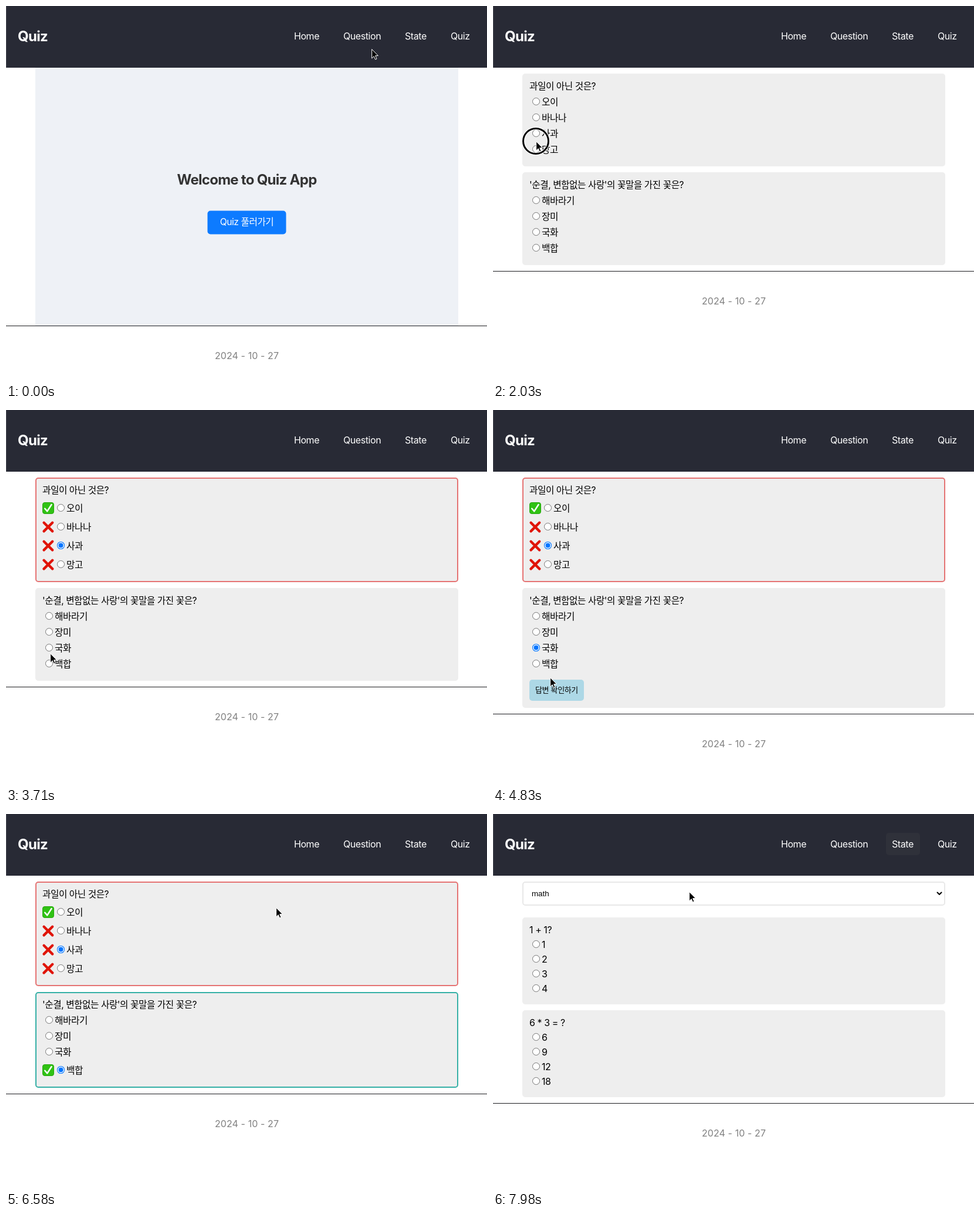
An HTML page for the animation above (8 s loop, 820 by 640 pixels).

```html
<!DOCTYPE html>
<html lang="ko">
<head>
<meta charset="utf-8">
<title>Quiz</title>
<style>
html, body { margin: 0; width: 100%; height: 100%; overflow: hidden; background: #fff; }
svg { display: block; width: 820px; height: 640px; }
text {
  font: 16px Inter, "Noto Sans CJK KR", "Noto Sans CJK", sans-serif;
  font-optical-sizing: none;
  letter-spacing: -.027em;
  white-space: pre;
}
.ko { font-size: 15.7px; letter-spacing: -.03em; }
.bold { font-size: 24px; font-weight: 700; letter-spacing: -.03em; }
.small { font-size: 13px; }
.date { letter-spacing: .1px; }
.select { font: 13.33px "Liberation Sans", Arial, sans-serif; letter-spacing: 0; }
.mid { text-anchor: middle; }
</style>
</head>
<body>
<svg id="stage" viewBox="0 0 820 640" xmlns="http://www.w3.org/2000/svg"></svg>
<script>
const stage = document.getElementById('stage');
const LOOP = 8000, STEP = 70;

const FRUIT = { q: '과일이 아닌 것은?', opts: ['오이', '바나나', '사과', '망고'], right: 0 };
const FLOWER = {
  q: "'순결, 변함없는 사랑'의 꽃말을 가진 꽃은?",
  opts: ['해바라기', '장미', '국화', '백합'], right: 3
};
const SUM = { q: '1 + 1?', opts: ['1', '2', '3', '4'], latin: true };
const PRODUCT = { q: '6 * 3 = ?', opts: ['6', '9', '12', '18'], latin: true };

// Pointer moves: start, end, then where to
const HOME = [623, 73];
const MOVES = [
  [210, 280, 625, 65], [560, 840, 628, 44], [1190, 1960, 73, 230],
  [2310, 2590, 93, 276], [2940, 3710, 75, 414], [4130, 4830, 97, 455],
  [5110, 5250, 70, 441], [5600, 5740, 93, 446], [5740, 5950, 98, 470],
  [6230, 6580, 460, 159], [6580, 6860, 697, 55], [7770, 7980, 334, 132]
];

// Press and release times
const CLICKS = {
  question: [420, 490], fruit: [2030, 2100], checkFruit: [2660, 2800],
  flower: [3920, 4060], flowerAgain: [5460, 5600], checkFlower: [6090, 6300],
  state: [7210, 7280]
};
const QUESTION_PAGE = 980, STATE_PAGE = 7490;

const clicked = (t, name) => t >= CLICKS[name][1];
const ease = u => u * u * (3 - 2 * u);

const rect = (x, y, w, h, fill, more = '') =>
  `<rect x="${x}" y="${y}" width="${w}" height="${h}" fill="${fill}" ${more}/>`;
const text = (x, y, s, cls = '', fill = '#000') =>
  `<text x="${x}" y="${y}" class="${cls}" fill="${fill}">${s}</text>`;
const line = (d, color, width) =>
  `<path d="${d}" fill="none" stroke="${color}" stroke-width="${width}" stroke-linecap="round" stroke-linejoin="round"/>`;
const circle = (x, y, r, fill, stroke = 'none', width = 0) =>
  `<circle cx="${x}" cy="${y}" r="${r}" fill="${fill}" stroke="${stroke}" stroke-width="${width}"/>`;

function pointerAt(t) {
  let [x, y] = HOME;
  for (const [from, to, nx, ny] of MOVES) {
    if (t <= from) break;
    const u = ease(Math.min(1, (t - from) / (to - from)));
    x += (nx - x) * u;
    y += (ny - y) * u;
  }
  return [x, y];
}

function over(t, x, y, w, h) {
  const [px, py] = pointerAt(t);
  return px >= x && px <= x + w && py >= y && py <= y + h;
}

// A hot area whose highlight fades over four steps
let hand = false;
function hotspot(t, fill, ...box) {
  hand = hand || over(t, ...box);
  let glow = 0;
  for (let k = 0; k < 4; k++) glow += over(t - k * STEP, ...box) / 4;
  return rect(...box, fill, `rx="5" opacity="${glow}"`);
}

function header(t) {
  const link = (label, x, w) =>
    hotspot(t, '#444548', x, 32, w, 38) + text(x + 10, 57, label, '', '#fff');
  return rect(0, 0, 820, 105, '#282a35') + rect(0, 0, 1, 105, '#4b4d56') +
    text(20, 60, 'Quiz', 'bold', '#fff') +
    link('Home', 481, 64) + link('Question', 565, 85) +
    link('State', 670, 58) + link('Quiz', 748, 53);
}

const footer = y => rect(0, y, 820, 1, '#1c1c20') +
  text(410.5, y + 57, '2024 - 10 - 27', 'date mid', '#808080');

const radio = (x, y, on) => on
  ? circle(x, y, 6, '#fff', '#0075ff', 1.1) + circle(x, y, 4, '#0075ff')
  : circle(x, y, 6, '#fff', '#767676', 1);

const mark = (y, ok) => ok
  ? rect(62.5, y - 9.5, 19, 19, '#30c214', 'rx="3.5" stroke="#28a810"') +
    line(`M66.3 ${y + .8}L70.3 ${y + 5.4} 77.6 ${y - 6}`, '#fff', 2.5)
  : line(`M64.6 ${y - 7.2}l14.6 14.6m0 -14.6l-14.6 14.6`, '#e01408', 4.4);

// Draws one question card and returns its bottom edge
function card(t, y, item, picked = -1, done = false) {
  const { q, opts, right, latin } = item;
  const cls = latin ? '' : 'ko';
  const wrong = done && picked !== right;
  let rowY = y + (latin ? 33 : 34);
  let body = text(62, y + 27, q, cls);
  opts.forEach((label, i) => {
    const marked = done && (wrong || i === right);
    const h = latin ? 25 : marked ? 32 : 27;
    const cy = rowY + (marked ? 17.5 : h / 2);
    const x = marked ? 93.5 : 73.5;
    if (marked) body += mark(cy + .5, i === right);
    body += radio(x, cy, i === picked) + text(x + 9.5, cy + 6.5, label, cls);
    rowY += h;
  });
  let bottom = rowY + (latin ? 15 : 16);
  if (picked >= 0 && !done) {
    const top = rowY + 14;
    body += rect(62, top, 93, 36, '#add8e6', 'rx="5"') +
      hotspot(t, '#33bbff', 62, top, 93, 36) +
      text(108.5, top + 22, '답변 확인하기', 'small mid');
    bottom = top + 48;
  }
  const box = done
    ? rect(51, y + 1, 719, bottom - y - 2, '#eee', `rx="4" stroke="${wrong ? '#e57373' : '#36b0a6'}" stroke-width="2"`)
    : rect(50, y, 721, bottom - y, '#eee', 'rx="5"');
  return { svg: box + body, bottom };
}

function cards(t, y, first, second) {
  const a = card(t, y, ...first), b = card(t, a.bottom + 10, ...second);
  return a.svg + b.svg + footer(b.bottom + 10);
}

function page(t) {
  if (t < QUESTION_PAGE) {
    return rect(50, 105, 721, 439, '#eef1f6') +
      text(410.5, 304, 'Welcome to Quiz App', 'bold mid', '#333') +
      rect(343.5, 348.5, 134, 40, '#0d7bff', 'rx="5"') +
      text(410.5, 373, 'Quiz 풀러가기', 'mid ko', '#fff') + footer(544);
  }
  if (t < STATE_PAGE) {
    const flower = clicked(t, 'flowerAgain') ? 3 : clicked(t, 'flower') ? 2 : -1;
    return cards(t, 115,
      [FRUIT, clicked(t, 'fruit') ? 2 : -1, clicked(t, 'checkFruit')],
      [FLOWER, flower, clicked(t, 'checkFlower')]);
  }
  return rect(51, 116, 719, 39, '#fff', 'rx="4" stroke="#e8e8e8" stroke-width="2"') +
    text(66, 140, 'math', 'select') +
    line('M757.5 133.5L761 137 764.5 133.5', '#000', 2) +
    cards(t, 176, [SUM], [PRODUCT]);
}

const ARROW = '<path d="M.7 .6V16L4.2 12.6 6.6 18 9 17 6.7 11.6H11.4Z" fill="#000" stroke="#fff"/>';
const HAND = '<path d="M-1.6 1.2C-1.6-.6 1.2-.6 1.4 1.2L2 6.2C2.4 5 4.6 5.2 4.8 6.6 5.4 5.6 7.2 6 7.4 7.4 8.2 6.8 9.6 7.4 9.6 9V12.5C9.6 14.5 8.4 15.5 8.2 17.5H.4C0 15.6-1.8 14-3 12.2-4.2 10.6-5.2 9.4-4.4 8.6-3.4 7.8-1.8 8.6-.8 10Z" fill="#fff" stroke="#000" stroke-linejoin="round"/>' +
  line('M2.4 11.5V15M4.6 11.5V15M6.8 11.5V15', '#000', .8);

// The ring grows while the button is held
function ring(t) {
  const press = Object.values(CLICKS).find(([down, up]) => t >= down && t < up);
  if (!press) return '';
  const r = Math.min(29.5, 21.5 + 8 * (t - press[0]) / STEP);
  return circle(0, 0, r, 'none', '#fff', 5) + circle(0, 0, r, 'none', '#000', 3);
}

function pointer(t) {
  const [x, y] = pointerAt(t);
  return `<g transform="translate(${x.toFixed(2)} ${y.toFixed(2)})">${ring(t)}${hand ? HAND : ARROW}</g>`;
}

const start = performance.now();
let shown = -1;
function draw() {
  const t = Math.floor(((performance.now() - start) % LOOP) / STEP) * STEP;
  if (t !== shown) {
    shown = t;
    hand = false;
    stage.innerHTML = rect(0, 0, 820, 640, '#fff') + page(t) + header(t) + pointer(t);
  }
  requestAnimationFrame(draw);
}
draw();
</script>
</body>
</html>
```
